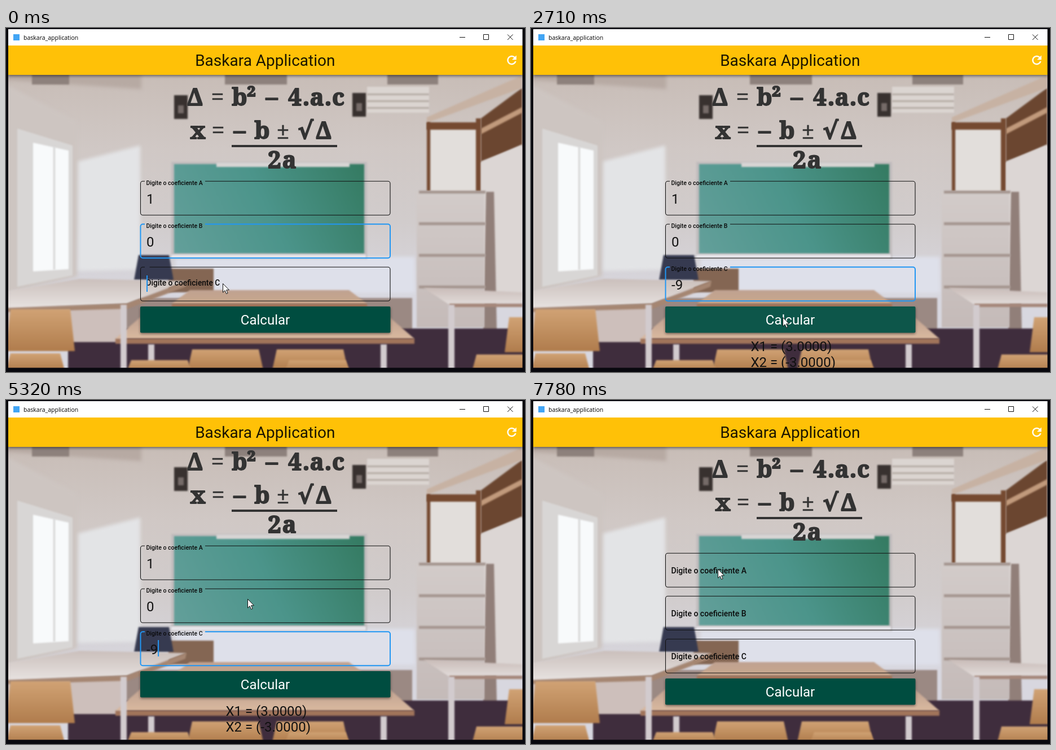
Write an HTML page with a canvas that moves like this. It is 920 px wide and 609 px high and loops after 8000 ms.

```html
<!DOCTYPE html>
<html lang="pt">
<head>
<meta charset="utf-8">
<title>baskara_application</title>
<style>
html, body { margin: 0; width: 100%; height: 100%; overflow: hidden; background: #08080e; }
canvas { display: block; }
</style>
</head>
<body>
<canvas id="stage" width="920" height="609"></canvas>
<script>
const W = 920, H = 609, LOOP = 8000;
const ctx = document.getElementById('stage').getContext('2d');
const BLUE = '#2196f3', INK = '#333';
const ROBOTO = 'Roboto, "Liberation Sans", sans-serif';
const FAT = '"Noto Serif", "DejaVu Serif", serif';

const clamp = v => Math.min(1, Math.max(0, v));
const ramp = (t, a, b) => clamp((t - a) / (b - a));
const ease = p => p * p * (3 - 2 * p);
const mix = (a, b, p) => a + (b - a) * p;

// ---------- classroom backdrop ----------
function makeRoom() {
  const room = document.createElement('canvas');
  room.width = W;
  room.height = H;
  const g = room.getContext('2d');

  function down(y, h, ...colors) {
    const r = g.createLinearGradient(0, y, 0, y + h);
    colors.forEach((c, i) => r.addColorStop(i / (colors.length - 1), c));
    return r;
  }
  function poly(fill, ...p) {
    g.fillStyle = fill;
    g.beginPath();
    for (let i = 0; i < p.length; i += 2) g.lineTo(p[i], p[i + 1]);
    g.fill();
  }
  // block whose top edge is drawn in on both sides
  const slab = (fill, x, y, w, h, inset = 0) =>
    poly(fill, x + inset, y, x + w - inset, y, x + w, y + h, x, y + h);
  // upright surface seen at an angle
  const side = (fill, x, top, bottom, x2, top2, bottom2) =>
    poly(fill, x, top, x2, top2, x2, bottom2, x, bottom);

  function speaker(x, y) {
    slab('#38312f', x, y, 24, 42);
    slab('#756b68', x + 7, y + 18, 10, 14);
  }
  function desk(x, y, w, h, inset, top) {
    slab(down(y, h, '#bfa190', top), x, y, w, h, inset);
    slab('#a1745a', x, y + h, w, 9);
  }
  function chair(x, y, w, h) {
    slab(down(y, h, '#d0a274', '#b07c4c'), x, y, w, h, 8);
  }

  slab(down(84, 390, '#c8bdb7', '#d0c8c5', '#d1cccc', '#d8d7df'), 0, 60, W, H);
  g.filter = 'blur(3px)';
  side('#b7aaa3', 0, 80, 92, 240, 80, 108);
  side('#cdc5c1', 0, 100, 470, 126, 165, 440);
  side('#e3e4e6', 128, 236, 430, 238, 208, 428);
  slab('#dee0ea', 300, 405, 425, 64);

  g.filter = 'blur(1.5px)';
  // ceiling lamps, air conditioner, speakers
  for (const [x, w] of [[46, 66], [388, 110], [676, 90]]) slab('#8d817c', x, 82, w, 18);
  slab('#dbd5d1', 640, 104, 110, 46);
  for (let y = 116; y < 150; y += 12) slab('#b5aaa4', 640, y, 110, 3);
  speaker(298, 119);
  speaker(614, 115);
  // window
  side('#d8d6d5', 20, 178, 458, 118, 208, 438);
  side('#f8fafb', 48, 203, 431, 111, 217, 427);
  slab('#d4d3d3', 84, 210, 3, 218);
  // wooden frame
  side('#6b4630', 842, 160, 236, 915, 106, 208);
  side('#c19a7c', 842, 178, 188, 915, 140, 150);
  side('#c7b2a3', 746, 158, 168, 915, 84, 106);
  slab('#e2dedb', 752, 178, 82, 112);
  slab('#754a31', 746, 167, 92, 13);
  slab('#754a31', 746, 167, 6, 122);
  slab('#754a31', 833, 160, 9, 130);
  // locker and shelves
  side('#dcd6d4', 842, 238, 480, 915, 206, 480);
  slab('#917f79', 846, 290, 24, 246, 5);
  slab(down(290, 240, '#d2cbc9', '#c4bab8'), 728, 290, 120, 240);
  for (let y = 288; y < 500; y += 56) slab('#a4958f', 732, y, 118, 5);
  // board
  slab('#c0bcbd', 293, 237, 347, 172);
  const board = g.createLinearGradient(298, 400, 636, 242);
  ['#639f9a', '#4b948a', '#347a61'].forEach((c, i) => board.addColorStop(i / 2, c));
  slab(board, 298, 241, 337, 158);
  slab('#d8d5d4', 373, 238, 236, 8);
  slab('#e6e5ea', 293, 401, 345, 7);

  // floor, cupboard and bag
  slab('#9b8983', 0, 478, 720, 66);
  slab('#3f2d3d', 110, 532, 810, 76);
  slab('#846653', 288, 426, 80, 42);
  slab('#363a50', 227, 402, 70, 44, 8);

  // furniture
  slab('#cdbfbb', 0, 492, 212, 64);
  poly(down(444, 50, '#cabfbb', '#e6e1df'), 0, 466, 130, 444, 320, 448, 214, 488, 0, 496);
  poly('#a58672', 0, 496, 214, 488, 320, 448, 318, 458, 216, 497, 0, 503);
  desk(294, 464, 346, 24, 32, '#c8a88d');
  slab('#a9968e', 240, 497, 440, 20, 40);
  desk(194, 512, 530, 38, 44, '#d9b99f');
  poly(down(460, 30, '#c9bcb8', '#e2dcda'), 740, 460, 915, 468, 915, 488, 786, 490);
  slab('#a5877a', 786, 488, 130, 6);
  for (const x of [203, 252, 664, 784]) slab('#d2cbce', x, 490 + (x % 200 > 50 && x < 700 ? 70 : 0), 11, 114);
  chair(0, 498, 122, 74);
  chair(0, 576, 104, 30);
  for (const x of [322, 472]) chair(x, 569, 134, 36);
  for (const x of [214, 494]) chair(x, 588, 116, 20);
  chair(884, 512, 50, 62);
  chair(826, 578, 120, 30);
  return room;
}

// ---------- helpers ----------
function text(s, x, y, size, { weight = 400, family = ROBOTO, align = 'left', color = '#111' } = {}) {
  ctx.font = `${weight} ${size}px ${family}`;
  ctx.textAlign = align;
  ctx.fillStyle = color;
  ctx.fillText(s, x, y);
}
function shadow(alpha, blur, dy) {
  ctx.shadowColor = `rgba(0,0,0,${alpha})`;
  ctx.shadowBlur = blur;
  ctx.shadowOffsetY = dy;
}
function at(x, y, draw) {
  ctx.save();
  ctx.translate(x, y);
  draw();
  ctx.restore();
}
function clipTo(x, y, w, h, draw) {
  ctx.save();
  ctx.beginPath();
  ctx.rect(x, y, w, h);
  ctx.clip();
  draw();
  ctx.restore();
}

// ---------- formula ----------
// each sign is centred on its own x
function signs(line, y, ...xs) {
  ctx.strokeStyle = INK;
  ctx.lineJoin = 'round';
  line.split(' ').forEach((s, i) => {
    const thin = '=±'.includes(s);
    text(s, xs[i], y, 42, { weight: thin ? 500 : 900, family: FAT, align: 'center', color: INK });
    ctx.lineWidth = thin ? .5 : 1.8;
    ctx.strokeText(s, xs[i], y);
  });
}
function formula() {
  signs('Δ = b ² – 4 . a . c', 137, 335, 375, 414, 435, 471, 512, 532, 551, 571, 589);
  signs('x = – b ± √ Δ', 196, 340, 376, 414, 454, 491, 531, 563);
  signs('2 a', 248, 476, 502);
  ctx.fillRect(400, 207, 187, 4);
}

// ---------- form ----------
function field(name, y, value, lift, focus) {
  const x = 238.5, r = 681, b = y + 60, k = 4;
  ctx.strokeStyle = focus ? BLUE : '#111';
  ctx.lineWidth = focus ? 2 : 1.1;
  ctx.beginPath();
  ctx.moveTo(246 + 107 * lift, y);
  ctx.arcTo(r, y, r, b, k);
  ctx.arcTo(r, b, x, b, k);
  ctx.arcTo(x, b, x, y, k);
  ctx.arcTo(x, y, r, y, k);
  ctx.lineTo(246, y);
  ctx.stroke();
  text('Digite o coeficiente ' + name, 248.5, mix(y + 35.3, y + 6.2, lift), mix(14, 10.5, lift), { weight: 500, color: '#0a0a0a' });
  text(value, 249, y + 39.5, 24);
}

function button(t) {
  const press = ramp(t, 2250, 2360) * (1 - ramp(t, 2460, 2700));
  const hover = ramp(t, 2200, 2250) * (1 - ramp(t, 2800, 2950));
  ctx.save();
  shadow(.45, 4 + 5 * press, 2 + 2 * press);
  ctx.fillStyle = '#004d40';
  ctx.beginPath();
  ctx.roundRect(238, 493, 443.5, 46.5, 2);
  ctx.fill();
  ctx.restore();
  ctx.fillStyle = `rgba(255,255,255,${.05 * hover + .12 * press})`;
  ctx.fill();
  text('Calcular', 459.5, 525, 24, { align: 'center', color: '#fff' });
}

const FOCUS = 120, MINUS = 680, NINE = 1060, CLICK = 2440, RESET = 7260;

// the blink starts anew with each key
function caretOn(t) {
  if (t >= RESET) return false;
  if (t < NINE) return t < 550 || t >= MINUS;
  return (t - NINE + 20) % 1000 < 480;
}

function content(t) {
  const cleared = t >= RESET;
  const typed = cleared ? '' : '-9'.slice(0, (t >= MINUS) + (t >= NINE));
  const drop = 1 - ease(ramp(t, RESET, RESET + 170));
  const liftC = cleared ? drop : mix(.08, 1, ease(ramp(t, FOCUS, 270)));

  formula();
  field('A', 271.3, cleared ? '' : '1', drop, false);
  field('B', 347.3, cleared ? '' : '0', drop, t < FOCUS);
  field('C', 423.3, typed, liftC, t >= FOCUS && !cleared);
  if (caretOn(t)) {
    ctx.font = `24px ${ROBOTO}`;
    ctx.textAlign = 'left';
    ctx.fillStyle = BLUE;
    ctx.fillRect(249 + ctx.measureText(typed).width, 438, 2, 29);
  }
  button(t);
  if (t >= CLICK && !cleared) {
    text('X1 = (3.0000)', 389.5, 571.5, 24);
    text('X2 = (-3.0000)', 389.5, 599.5, 24);
  }
}

// ---------- window ----------
const refresh = new Path2D('M17.65 6.35C16.2 4.9 14.21 4 12 4c-4.42 0-7.99 3.58-7.99 8s3.57 8 7.99 8c3.73 0 6.84-2.55 7.73-6h-2.08c-.82 2.33-3.04 4-5.65 4-3.31 0-6-2.69-6-6s2.69-6 6-6c1.66 0 3.14.69 4.22 1.78L13 11h7V4l-2.35 2.35z');

function disc(r, alpha) {
  ctx.fillStyle = `rgba(0,0,0,${alpha})`;
  ctx.beginPath();
  ctx.arc(897, 57, r, 0, 7);
  ctx.fill();
}

function appBar(t) {
  ctx.save();
  shadow(.5, 5, 2);
  ctx.fillStyle = '#ffc107';
  ctx.fillRect(4, 31, 911.5, 52);
  ctx.restore();
  clipTo(4, 31, 911.5, 52, () => {
    disc(33, .04 * ramp(t, 6990, 7060) * (1 - ramp(t, 7380, 7450)));
    disc(33 * ramp(t, 7210, 7380), .1 * (1 - ramp(t, 7380, 7520)));
  });
  text('Baskara Application', 459.3, 67, 28, { align: 'center', color: '#1c1600' });
  at(884.5, 45, () => {
    ctx.fillStyle = ctx.strokeStyle = '#fff';
    ctx.lineWidth = .5;
    ctx.fill(refresh);
    ctx.stroke(refresh);
  });
}

function titleBar() {
  ctx.fillStyle = '#fff';
  ctx.fillRect(4, 2, 911.5, 29);
  ctx.fillStyle = '#42a5f5';
  ctx.fillRect(13, 11, 11, 11);
  text('baskara_application', 31, 20.5, 10.5, { family: '"Open Sans", "Noto Sans", sans-serif', color: '#000' });
  ctx.strokeStyle = '#111';
  ctx.lineWidth = 1;
  ctx.stroke(new Path2D('M804 16.5h10M846.5 11.5h9v9h-9zM889 11.5l9.5 9.5M898.5 11.5l-9.5 9.5'));
}

// pointer moves: from time, to time, x, y
const moves = [
  [2100, 2350, 446, 512],
  [2710, 3250, 450, 583],
  [4100, 4570, 384, 583],
  [4700, 5300, 428, 352],
  [5500, 6100, 424, 442],
  [6320, 6970, 886, 54],
  [7260, 7720, 331, 299]
];
const arrow = new Path2D('M.5 .5v15.6l3.6-3.4 2.5 5.8 2.5-1.1-2.5-5.6h4.9z');

function pointer(t) {
  let x = 384, y = 452;
  for (const [from, to, tx, ty] of moves) {
    const p = ease(ramp(t, from, to));
    x = mix(x, tx, p);
    y = mix(y, ty, p);
  }
  at(x, y, () => {
    ctx.fillStyle = '#fff';
    ctx.strokeStyle = '#111';
    ctx.lineWidth = 1;
    ctx.fill(arrow);
    ctx.stroke(arrow);
  });
}

const room = makeRoom();

function draw(t) {
  const scroll = t < RESET ? 13 * ease(ramp(t, 4060, 4330)) : 0;
  ctx.fillStyle = '#08080e';
  ctx.fillRect(0, 0, W, H);
  clipTo(4, 83, 911.5, 518.5, () => {
    ctx.drawImage(room, 0, 0);
    at(0, -scroll, () => content(t));
  });
  appBar(t);
  titleBar();
  pointer(t);
}

const start = performance.now();
function frame() {
  draw((performance.now() - start) % LOOP);
  requestAnimationFrame(frame);
}
frame();
</script>
</body>
</html>
```
